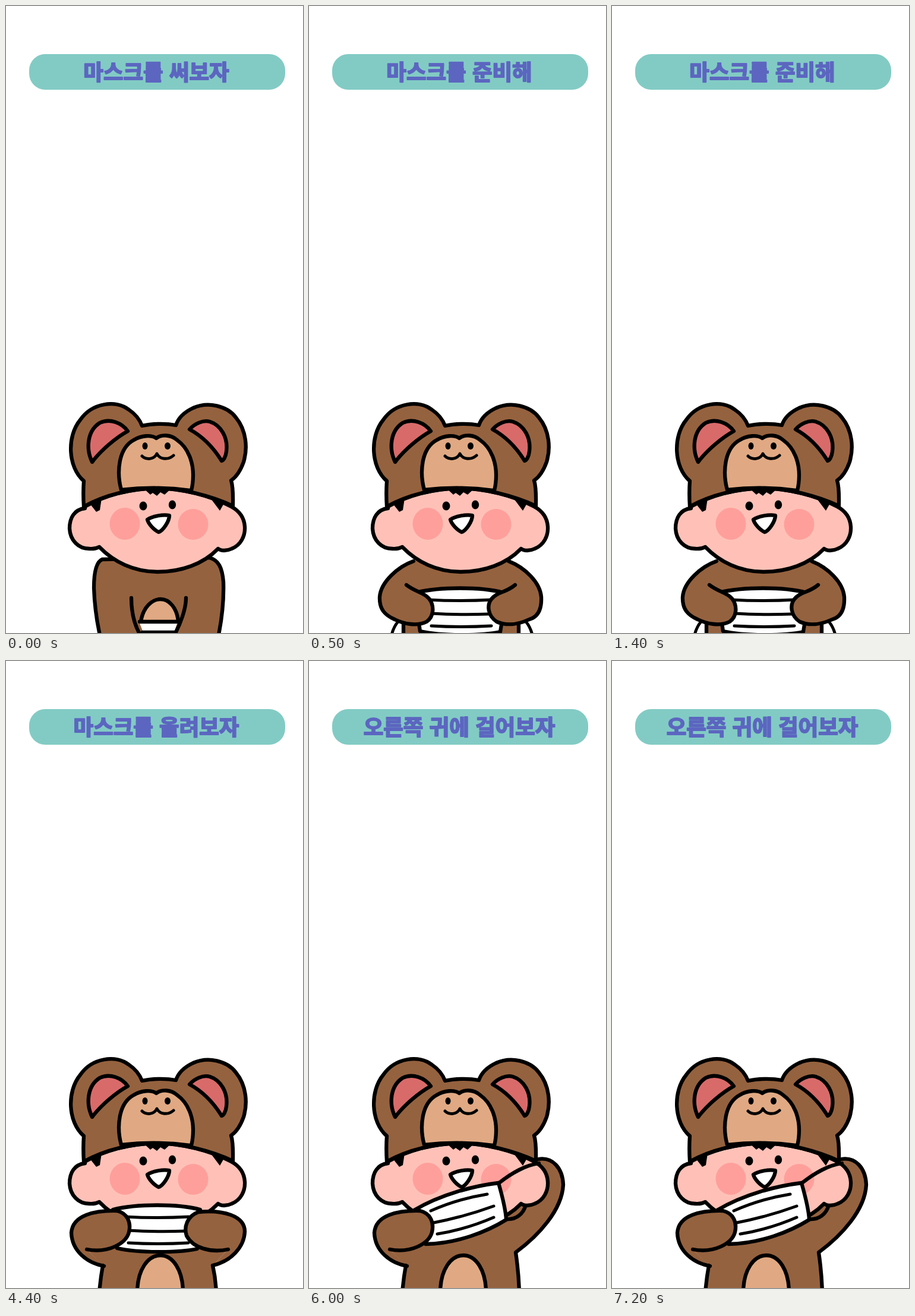
An HTML page for the animation above (8000 ms loop, 500 by 1056 pixels).

```html
<!DOCTYPE html>
<html lang="ko">
<head>
<meta charset="utf-8">
<title>마스크를 써보자</title>
<style>
  html, body { margin: 0; width: 100%; height: 100%; overflow: hidden; background: #fff; }
  svg { display: block; width: 100vw; height: 100vh; }
  .ink { stroke: #000; stroke-width: 6.3; stroke-linecap: round; stroke-linejoin: round; }
  .line { fill: none; }
  .fur { fill: #95623f; }
  .tan { fill: #e0a983; }
  .skin { fill: #ffc1b7; }
  .rose { fill: #d96a6a; }
  .blush { fill: #ff9f9b; }
  .white { fill: #fff; }
  .thin { stroke-width: 5; }
  text {
    font: 900 36.5px "Noto Sans CJK KR", "Noto Sans CJK", "Noto Sans CJK JP", sans-serif;
    fill: #5c66c0; stroke: #5c66c0; stroke-width: 2; stroke-linejoin: round; text-anchor: middle;
  }
  .s1, .s2, .s3 { visibility: hidden; }
</style>
</head>
<body>
<svg viewBox="0 0 500 1056" preserveAspectRatio="none">
  <defs>
    <g id="mask">
      <path class="ink white" d="M180 924C220 914 290 914 327 924C328 948 326 970 322 990C290 997 222 997 187 989C184 970 181 945 180 924Z"/>
      <path class="ink line thin" d="M200 936Q255 939 308 936M206 959Q255 962 304 960M206 980Q255 983 307 980"/>
    </g>
    <path id="belly" class="ink tan" d="M221 1064C221 1025 239 1001 260 1001C281 1001 298 1026 298 1064"/>
    <path id="leftArm" class="ink fur" d="M165 1019C137 1014 111 994 110 963C112 933 150 925 187 926C204 930 211 945 207 962C202 981 172 998 136 991"/>
  </defs>

  <rect x="39" y="81" width="431" height="60" rx="27" fill="#82cbc4"/>
  <g id="titles"></g>

  <!-- behind the head -->
  <g class="s0">
    <path class="ink fur" d="M162 932C150 937 148 960 148 980C149 1010 153 1038 159 1064H357C363 1035 367 1000 366 970C364 946 358 933 342 929Z"/>
    <path class="ink tan" d="M227 1037C231 1011 247 999 260 999C275 999 288 1014 290 1037"/>
    <path class="white" d="M224 1037H289L283 1055H231Z"/>
    <path class="ink line" d="M225 1037H288M230 1055H284M211 997C211 1020 215 1043 229 1064M303 997C303 1015 294 1041 281 1064"/>
  </g>
  <g class="s1">
    <path class="ink line thin" d="M149 1038Q141 1048 138 1064M366 1038Q374 1048 377 1064"/>
    <path class="fur" d="M176 934L120 990L160 1030V1064H352V1030L390 990L338 934Z"/>
    <path class="ink line" d="M159 1036V1064M353 1036V1064"/>
    <use href="#mask" y="64"/>
    <path class="ink fur" d="M176 935C150 944 121 970 119 995C118 1016 128 1026 144 1033C160 1041 182 1045 198 1037C211 1028 211 1009 202 998C193 987 179 987 164 975"/>
    <path class="ink fur" d="M336 935C364 946 389 971 391 995C392 1016 385 1029 371 1033C352 1042 332 1044 316 1037C301 1027 299 1009 307 999C316 987 332 988 347 975"/>
  </g>
  <g class="s2">
    <path class="fur" d="M180 940L136 991L163 1018Q159 1040 157 1064H354Q353 1040 348 1018L374 991L330 940Z"/>
    <path class="ink line" d="M163 1018Q159 1040 157 1064M348 1018Q353 1040 354 1064"/>
    <use href="#belly"/>
  </g>
  <g class="s3">
    <path class="fur" d="M180 940L136 991L163 1018Q159 1040 157 1064H354Q353 1030 348 996C386 968 426 925 428 882C427 854 410 835 386 839L340 920Z"/>
    <path class="ink line" d="M163 1018Q159 1040 157 1064M354 1064Q353 1030 348 996C386 968 426 925 428 882C427 854 410 835 386 839M333 940C349 941 361 931 365 916"/>
    <use href="#belly"/>
  </g>

  <!-- face -->
  <path class="ink skin" d="M133 846C115 848 107 862 107 880C108 900 122 914 140 914Q150 915 157 911C181 936 215 953 255 953C295 953 332 940 357 914C362 918 372 918 380 914C395 908 403 893 402 877C401 860 392 850 379 843C345 825 295 812 254 812C212 813 170 822 133 843Z"/>
  <ellipse class="blush" cx="200" cy="872" rx="25.5" ry="27"/>
  <ellipse class="blush" cx="315" cy="873" rx="25.5" ry="26"/>
  <ellipse cx="231" cy="842" rx="6.5" ry="7.5"/>
  <ellipse cx="280" cy="840" rx="6.2" ry="7.5"/>
  <path class="ink white" d="M238 865C246 859 265 856 275 858C275 868 264 884 257 886C250 883 240 873 238 865Z"/>
  <path d="M141 838L152 852L158 849L161 829ZM342 826L360 850L368 836ZM230 811L243 823L247 820L254 825L260 819L267 823L279 812Z"/>

  <!-- hood -->
  <path class="ink fur" d="M131 843C130 828 130 814 131 800C104 777 102 725 125 697C145 668 185 663 207 680C219 688 226 699 229 707C247 703 270 703 286 706C290 694 300 684 315 677C340 666 372 673 387 693C405 715 407 745 400 768C395 782 388 793 379 799C383 812 382 830 382 842C345 825 295 812 254 812C212 813 170 822 131 843Z"/>
  <path class="ink rose" d="M145 768C134 745 137 715 158 702C175 694 195 702 205 716C185 727 160 748 145 768Z"/>
  <path class="ink rose" d="M309 713C318 703 332 697 343 700C362 706 374 727 371 750C370 760 366 765 363 766C350 745 333 726 309 713Z"/>
  <path class="ink tan" d="M194 815C186 785 189 745 215 731C228 723 245 722 253 728C262 721 278 722 288 731C308 745 315 770 315 790Q315 804 312 816Q253 808 194 815Z"/>
  <ellipse cx="234" cy="741" rx="4.5" ry="6"/>
  <ellipse cx="272" cy="741" rx="5" ry="6"/>
  <path class="ink line thin" d="M229 758C236 765 249 764 254 754C259 764 273 765 282 757"/>

  <!-- in front of the head -->
  <g class="s2">
    <use href="#mask"/>
    <use href="#leftArm"/>
    <path class="ink fur" d="M348 1018C379 1011 401 987 402 961C402 934 365 924 324 928C305 935 299 953 304 968C315 989 345 997 374 991"/>
  </g>
  <g class="s3">
    <path class="ink line" d="M320 879C340 863 365 849 387 846"/>
    <path class="ink white" d="M177 925C222 898 278 884 319 879C325 900 331 922 332 941C300 961 250 981 196 982Z"/>
    <path class="ink line thin" d="M205 926Q250 906 300 898M210 946Q262 936 311 918M216 965Q265 957 311 937"/>
    <use href="#leftArm"/>
  </g>
</svg>
<script>
  const LOOP = 8000;
  const scenes = [
    [0, 500, "마스크를 써보자"],
    [500, 2000, "마스크를 준비해"],
    [2000, 6000, "마스크를 올려보자"],
    [6000, 8000, "오른쪽 귀에 걸어보자"]
  ];
  const titles = document.getElementById("titles");

  function addTitle(label, i) {
    const t = document.createElementNS("http://www.w3.org/2000/svg", "text");
    t.setAttribute("class", "s" + i);
    t.setAttribute("x", 253);
    t.setAttribute("y", 125);
    t.textContent = label;
    titles.append(t);
  }

  scenes.forEach(([, , label], i) => addTitle(label, i));
  const parts = scenes.map((_, i) => document.querySelectorAll(".s" + i));

  function draw() {
    const t = performance.now() % LOOP;
    scenes.forEach(([from, to], i) => {
      const state = t >= from && t < to ? "visible" : "hidden";
      parts[i].forEach(el => { el.style.visibility = state; });
    });
    requestAnimationFrame(draw);
  }
  draw();
</script>
</body>
</html>
```
